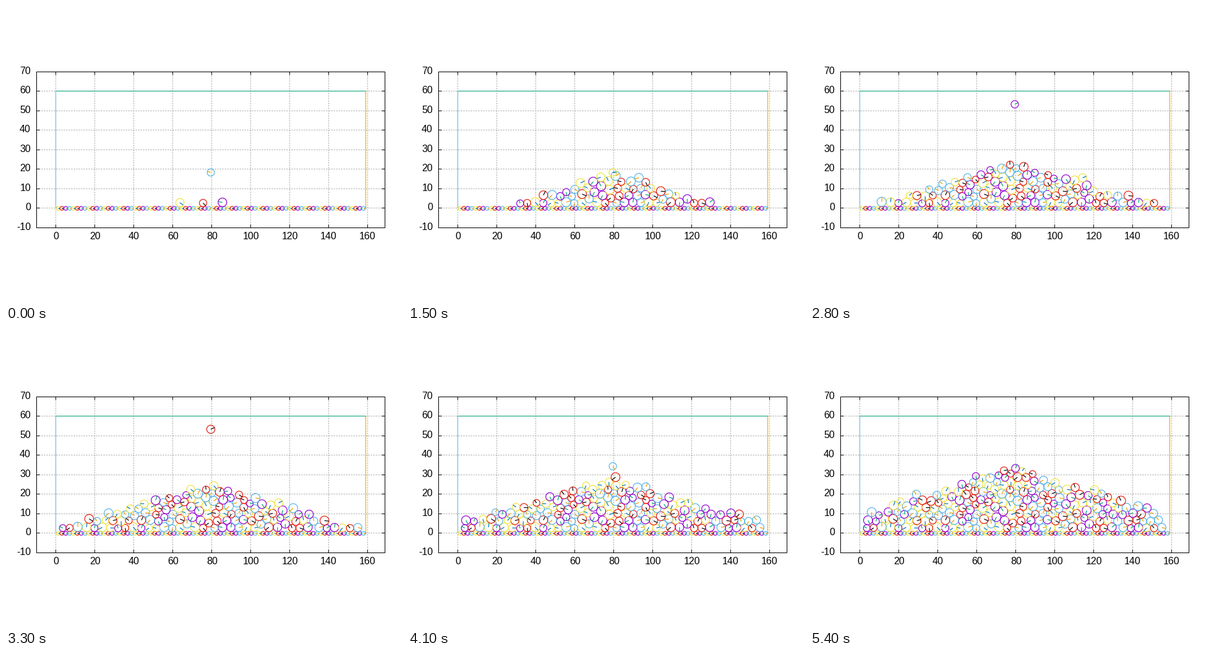
A matplotlib script that plays this animation: 640x480 px, repeating every 5500 ms.

```python
import numpy as np
import matplotlib.pyplot as plt
from matplotlib.animation import FuncAnimation
from matplotlib.collections import LineCollection

W, H, DPI = 640, 480, 100
PX = 72 / DPI                      # one pixel in points
LEFT, RIGHT, TOP, BOTTOM = 49.5, 612.5, 106.5, 358.5
WIDTH, CEILING = 159, 60           # container, in data units
FRAMES, INTERVAL = 55, 100

PURPLE, GREEN, SKY, ORANGE = "#9400d3", "#009e73", "#56b4e9", "#e69f00"
YELLOW, BLUE, RED, BLACK = "#f0e442", "#0072b2", "#e51e10", "#000000"
# Outline and spoke colours alternate; each disc takes the next two.
DISC_COLORS = [YELLOW, BLUE, RED, BLACK, PURPLE, GREEN, SKY, ORANGE]

FLOOR_COUNT, DROP_COUNT = 80, 209
DROP_X, DROP_Y, FALL = 79.5, 56.4, 54.5
DROPS_PER_FRAME, FIRST_DROPS = 3.8, 3.835
FIRST_STOPS = (64.5, 75.5, 86)     # where the earliest drops come to rest
STRAY_CHANCE, STRAY_SPREAD = 0.08, 40


def to_px(x, y):
    return (LEFT + (x + 10) * (RIGHT - LEFT) / 179,
            BOTTOM - (y + 10) * (BOTTOM - TOP) / 80)


def surface(count, x):
    """Height of the pile at x: a cone that grows with the number of drops."""
    return 2.25 * np.sqrt(count) - 2.3 - 0.3 * np.abs(x - DROP_X)


def resting_sites(x, y, r, rad):
    """Centres where a disc of radius rad sits on two others."""
    i, j = np.triu_indices(len(x), 1)
    near = np.hypot(x[j] - x[i], y[j] - y[i]) < r[i] + r[j] + 2 * rad
    i, j = i[near], j[near]
    dx, dy = x[j] - x[i], y[j] - y[i]
    d = np.hypot(dx, dy)
    a, b = r[i] + rad, r[j] + rad
    t = (a**2 - b**2 + d**2) / (2 * d)
    h = np.sqrt(np.maximum(a**2 - t**2, 0)) * np.where(dx >= 0, 1, -1)
    sx = x[i] + (t * dx - h * dy) / d
    sy = y[i] + (t * dy + h * dx) / d
    ok = ((sx >= np.minimum(x[i], x[j])) & (sx <= np.maximum(x[i], x[j]))
          & (sx >= rad) & (sx <= WIDTH - rad) & (sy > 1))
    sx, sy = sx[ok], sy[ok]
    gap2 = (sx[:, None] - x) ** 2 + (sy[:, None] - y) ** 2
    free = (gap2 >= (r + rad - 0.1) ** 2).all(axis=1)
    return sx[free], sy[free]


def build_pile():
    rng = np.random.default_rng(7)
    step = WIDTH / FLOOR_COUNT
    x = step * (np.arange(FLOOR_COUNT) + 0.5)
    y = np.zeros(FLOOR_COUNT)
    r = np.full(FLOOR_COUNT, step / 2)
    angle = np.zeros(FLOOR_COUNT)
    for n in range(DROP_COUNT):
        rad, turn = rng.uniform(1.7, 2.35), rng.uniform(0, 2 * np.pi)
        stray = rng.random() < STRAY_CHANCE
        goal = rng.normal(DROP_X, STRAY_SPREAD)
        if n < len(FIRST_STOPS):
            stray, goal = True, FIRST_STOPS[n]
        sx, sy = resting_sites(x, y, r, rad)
        if stray:
            score = -np.abs(sx - goal) - sy
        else:
            score = surface(n + 1, sx) - sy + rng.normal(0, 0.6, len(sx))
        best = np.argmax(score)
        x, y = np.append(x, sx[best]), np.append(y, sy[best])
        r, angle = np.append(r, rad), np.append(angle, turn)
    return list(zip(x, y, r, angle))


CIRCLE = np.linspace(0, 2 * np.pi, 41)


def disc(x, y, r, angle):
    """Outline and spoke of one disc, in pixels."""
    ring = to_px(x + r * np.cos(CIRCLE), y + r * np.sin(CIRCLE))
    ends = np.array([0, r])
    spoke = to_px(x + ends * np.cos(angle), y + ends * np.sin(angle))
    return [np.column_stack(ring), np.column_stack(spoke)]


plt.rcParams["font.family"] = "Liberation Sans"
fig = plt.figure(figsize=(W / DPI, H / DPI), dpi=DPI, facecolor="white")
ax = fig.add_axes([0, 0, 1, 1])
ax.set_xlim(0, W)
ax.set_ylim(H, 0)
ax.axis("off")


def line(xs, ys, color=BLACK, z=5, **kw):
    """One-pixel line through the centres of whole pixels."""
    ax.plot(np.floor(xs) + 0.5, np.ceil(ys) - 0.5, color=color, lw=PX,
            zorder=z, solid_capstyle="butt", snap=False, **kw)


def draw_axes():
    grid = dict(color="#a0a0a0", z=1, ls=(0, (2, 2)), dash_capstyle="butt")
    text = dict(size=16 * PX, va="baseline")
    for v in range(0, 161, 20):
        px = to_px(v, 0)[0]
        line([px, px], [BOTTOM, TOP], **grid)
        line([px, px], [BOTTOM, BOTTOM - 5])
        line([px, px], [TOP, TOP + 5])
        ax.text(px + 0.2, 376.6, str(v), ha="center", **text)
    for v in range(-10, 71, 10):
        py = to_px(0, v)[1]
        line([LEFT, RIGHT], [py, py], **grid)
        line([LEFT, LEFT + 5], [py, py])
        line([RIGHT, RIGHT - 5], [py, py])
        ax.text(40, py + 3.4, str(v), ha="right", **text)
    line([LEFT, RIGHT, RIGHT, LEFT, LEFT], [BOTTOM, BOTTOM, TOP, TOP, BOTTOM])


def draw_walls():
    x0, y0 = to_px(0, 0)
    x1, y1 = to_px(WIDTH, CEILING)
    line([x0, x1], [y1, y1], GREEN, 2)
    line([x0, x0], [y0, y1], SKY, 2)
    line([x1, x1], [y0, y1], ORANGE, 2)


draw_axes()
draw_walls()
pile = build_pile()
shapes = [part for d in pile for part in disc(*d)]
discs = LineCollection([], colors=DISC_COLORS, linewidths=1.2 * PX, zorder=4)
ax.add_collection(discs, autolim=False)


def update(frame):
    drops = FIRST_DROPS + DROPS_PER_FRAME * frame
    landed = int(drops)
    parts = shapes[:2 * (FLOOR_COUNT + landed)]
    if landed < DROP_COUNT:
        x, y, r, angle = pile[FLOOR_COUNT + landed]
        fall_y = DROP_Y - FALL * (drops - landed) ** 2
        if fall_y > surface(landed, DROP_X) + 2.5:
            x, y = DROP_X, fall_y
        parts = parts + disc(x, y, r, angle)
    discs.set_segments(parts)
    return [discs]


anim = FuncAnimation(fig, update, frames=FRAMES, interval=INTERVAL,
                     repeat=True, repeat_delay=0, blit=False)
plt.show()
```
